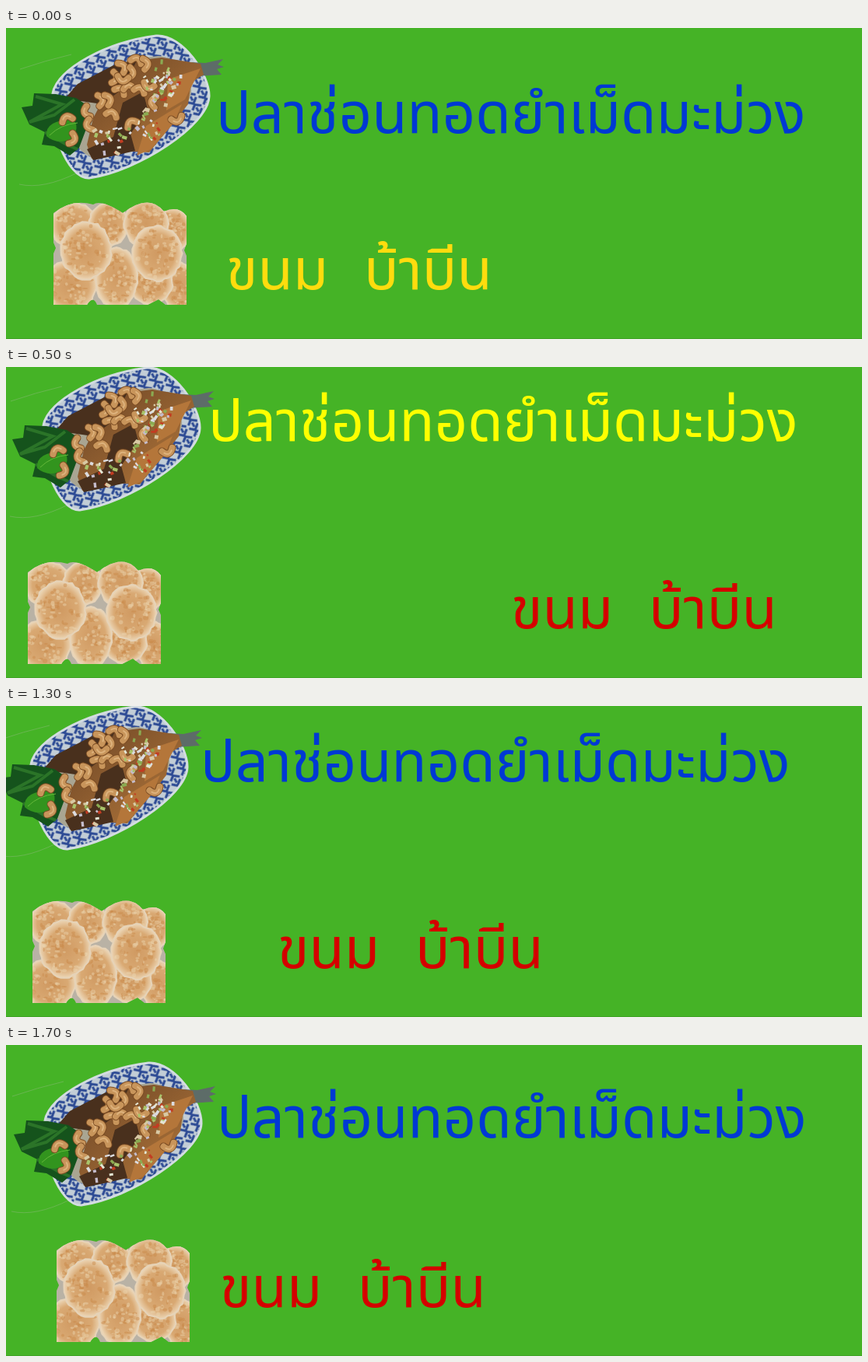
Recreate the animation shown at these times as an HTML page. Size 1100 by 400 pixels, loop 1900 ms.

```html
<!DOCTYPE html>
<html lang="th">
<head>
<meta charset="utf-8">
<title>เมนูอาหาร</title>
<style>
  html, body { margin: 0; width: 100%; height: 100%; overflow: hidden; background: #45b326; }
  svg { display: block; width: 1100px; height: 400px; }
  text { font: 74px "Noto Sans Thai Looped", "Noto Sans Thai", "Noto Sans", sans-serif; }
</style>
</head>
<body>
<svg viewBox="0 0 1100 400">
  <defs>
    <pattern id="tiles" width="16" height="16" patternUnits="userSpaceOnUse" patternTransform="rotate(-28)">
      <rect width="16" height="16" fill="#c2cdd6"/>
      <path d="M1 2L7 7L14 1M2 14L8 9L15 14M8 3V0M8 16V13" fill="none" stroke="#2c4a94" stroke-width="3"/>
    </pattern>
    <radialGradient id="crust">
      <stop offset="0" stop-color="#d09a62"/>
      <stop offset=".7" stop-color="#d9a973"/>
      <stop offset="1" stop-color="#ecd6b6"/>
    </radialGradient>
    <linearGradient id="flesh" x1="0" y1="0" x2="1" y2="1">
      <stop offset="0" stop-color="#6b4425"/>
      <stop offset="1" stop-color="#b67a3c"/>
    </linearGradient>
    <clipPath id="tray"><path d="M61 238Q85 219 112 227Q122 220 150 238Q184 212 203 236Q222 228 232 242V277L229 286L232 293V356H205L196 349L182 356H117Q112 343 104 356H61V290L64 283L61 276Z"/></clipPath>
  </defs>
  <rect width="1100" height="400" fill="#45b326"/>
  <rect y="399" width="1100" height="1" fill="#40a326"/>

  <g id="dish">
    <path d="M17 201Q48 208 92 186M18 53Q50 42 84 34" fill="none" stroke="#78b862" stroke-width=".7"/>
    <path d="M60 84C66 52 130 18 193 10C228 8 262 62 261 88C260 125 170 184 107 193C78 195 52 120 60 84Z" fill="url(#tiles)" stroke="#d3dce1" stroke-width="3"/>
    <path d="M78 98C92 68 140 42 195 36C220 36 240 62 238 84C232 112 172 154 116 166C92 168 76 128 78 98Z" fill="#a9a592"/>
    <path d="M238 44L256 45L279 40L272 47L280 50L271 53L277 60L246 62Z" fill="#5d6c68"/>
    <path d="M104 150L112 116L150 44L200 38L250 46L254 60L238 70L234 98L212 126L184 160L150 158L110 168Z" fill="url(#flesh)"/>
    <path d="M72 95L92 72L138 48L168 42L150 78L124 98L96 94ZM150 96L176 82L182 104L160 136L166 158L140 164L112 170L104 156L138 140Z" fill="#49301d"/>
    <path d="M180 126L226 98L216 122L186 156L168 164ZM208 66L250 52L230 92L206 106Z" fill="#b4763a"/>
    <path d="M20 102L34 100L36 84L64 85L90 90L102 98L106 122L94 154L82 164L62 152L46 150L50 134L30 124Z" fill="#15531c"/>
    <path d="M38 88L72 98L30 121L62 112L88 92M50 134L78 150L92 156" fill="none" stroke="#2b7428" stroke-width="4"/>
    <path d="M52 139Q50 118 86 118Q96 126 84 144Q64 150 52 139Z" fill="#32941e"/>
    <path d="M56 138Q70 124 92 122" fill="none" stroke="#65b93b"/>
    <g id="nuts" fill="none" stroke-linecap="round"></g>
    <g id="bits"></g>
  </g>

  <g id="cakes">
    <g clip-path="url(#tray)">
      <rect x="61" y="215" width="171" height="141" fill="#b9b2a5"/>
      <g id="rounds"></g>
    </g>
  </g>

  <text id="top">ปลาช่อนทอดยำเม็ดมะม่วง</text>
  <g id="low"><text>ขนม</text><text x="177">บ้าบีน</text></g>
</svg>
<script>
const $ = id => document.getElementById(id);

let seed = 11;
const rnd = () => (seed = seed * 16807 % 2147483647) / 2147483647;
const spread = r => (rnd() + rnd() - 1) * r;

function add(parent, tag, attrs) {
  const el = document.createElementNS("http://www.w3.org/2000/svg", tag);
  for (const k in attrs) el.setAttribute(k, attrs[k]);
  parent.append(el);
  return el;
}

// Cashews: x, y, turn in degrees
[[140, 64, 100], [150, 50, 60], [168, 41, 20], [180, 46, 80], [161, 58, 100], [147, 80, 30],
 [158, 76, 0], [172, 79, 20], [183, 75, 200], [189, 95, 280], [103, 108, 250], [122, 93, 80],
 [106, 125, 250], [136, 110, 20], [161, 122, 330], [78, 116, 340], [86, 143, 110], [220, 118, 160],
 [132, 92, 70], [150, 66, 190]
].forEach(([x, y, a]) => {
  const nut = add($("nuts"), "g", { transform: `translate(${x} ${y}) rotate(${a})` });
  const d = "M-7 3Q0 -8 7 3";
  add(nut, "path", { d, stroke: "#7c4d24", "stroke-width": 10 });
  add(nut, "path", { d, stroke: "#c8955b", "stroke-width": 8 });
  add(nut, "path", { d: "M-5 0Q0 -6 5 0", stroke: "#ddb27c", "stroke-width": 2 });
});

// Chopped onion, lime and chilli
const tones = ["#dcdce0", "#c5bccb", "#a9c46b", "#e4e6d4", "#8bab52", "#d8c9a4", "#c23c22"];
function scatter(n, x, y, rx, ry) {
  for (let i = 0; i < n; i++) {
    const w = 2 + rnd() * 5;
    add($("bits"), "rect", {
      width: w, height: 2 + rnd() * 3, fill: tones[i % tones.length],
      transform: `translate(${x + spread(rx)} ${y + spread(ry)}) rotate(${rnd() * 180})`
    });
  }
}
scatter(46, 206, 68, 27, 38);
scatter(22, 182, 122, 22, 24);
scatter(22, 135, 142, 28, 22);

// Round cakes: x, y, rx, ry
[[88, 254, 30, 29], [132, 252, 25, 28], [214, 260, 24, 28], [180, 252, 28, 30],
 [222, 332, 22, 30], [186, 328, 28, 27], [82, 332, 34, 32], [142, 322, 27, 39],
 [103, 286, 32, 37], [194, 290, 32, 35]
].forEach(([x, y, rx, ry]) => {
  const pts = [];
  for (let i = 0; i < 40; i++) {
    const a = i * Math.PI / 20, k = .96 + rnd() * .08;
    pts.push([x + rx * k * Math.cos(a), y + ry * k * Math.sin(a)].map(v => v.toFixed(1)));
  }
  add($("rounds"), "polygon", { points: pts.join(" "), fill: "url(#crust)", stroke: "#e6d3b8", "stroke-width": 2 });
  for (let i = 0; i < 70; i++) {
    const a = rnd() * 6.283, k = Math.sqrt(rnd()) * .88;
    add($("rounds"), "ellipse", {
      cx: x + rx * k * Math.cos(a), cy: y + ry * k * Math.sin(a),
      rx: 1 + rnd() * 2.5, ry: 1 + rnd() * 2,
      fill: i % 2 ? "#ecd5b0" : "#c78847", opacity: .45
    });
  }
});

const BLUE = "#0039d4", RED = "#d40000";
const steps = [
  { end: 500,  dish: [0, 0],    cakes: [0, 0],    top: [270, 135, BLUE],      low: [283, 336, "#ffdc0e"] },
  { end: 1000, dish: [-12, -9], cakes: [-33, 26], top: [260, 95, "#ffff00"],  low: [649, 336, RED] },
  { end: 1500, dish: [-28, -9], cakes: [-27, 26], top: [250, 97, BLUE],       low: [349, 337, RED] },
  { end: 1700, dish: [-12, 10], cakes: [-12, 24] },
  { end: 1900, dish: [-10, 13], cakes: [4, 26],   top: [271, 119, BLUE],      low: [275, 337, RED] }
];

function place(id, pose) {
  const el = $(id);
  el.setAttribute("visibility", pose ? "visible" : "hidden");
  if (!pose) return;
  el.setAttribute("transform", `translate(${pose[0]} ${pose[1]})`);
  if (pose[2]) el.setAttribute("fill", pose[2]);
}

let shown;
function draw() {
  const t = performance.now() % 1900;
  const step = steps.find(s => t < s.end);
  if (step !== shown) {
    for (const id of ["dish", "cakes", "top", "low"]) place(id, step[id]);
    shown = step;
  }
  requestAnimationFrame(draw);
}
draw();
</script>
</body>
</html>
```
